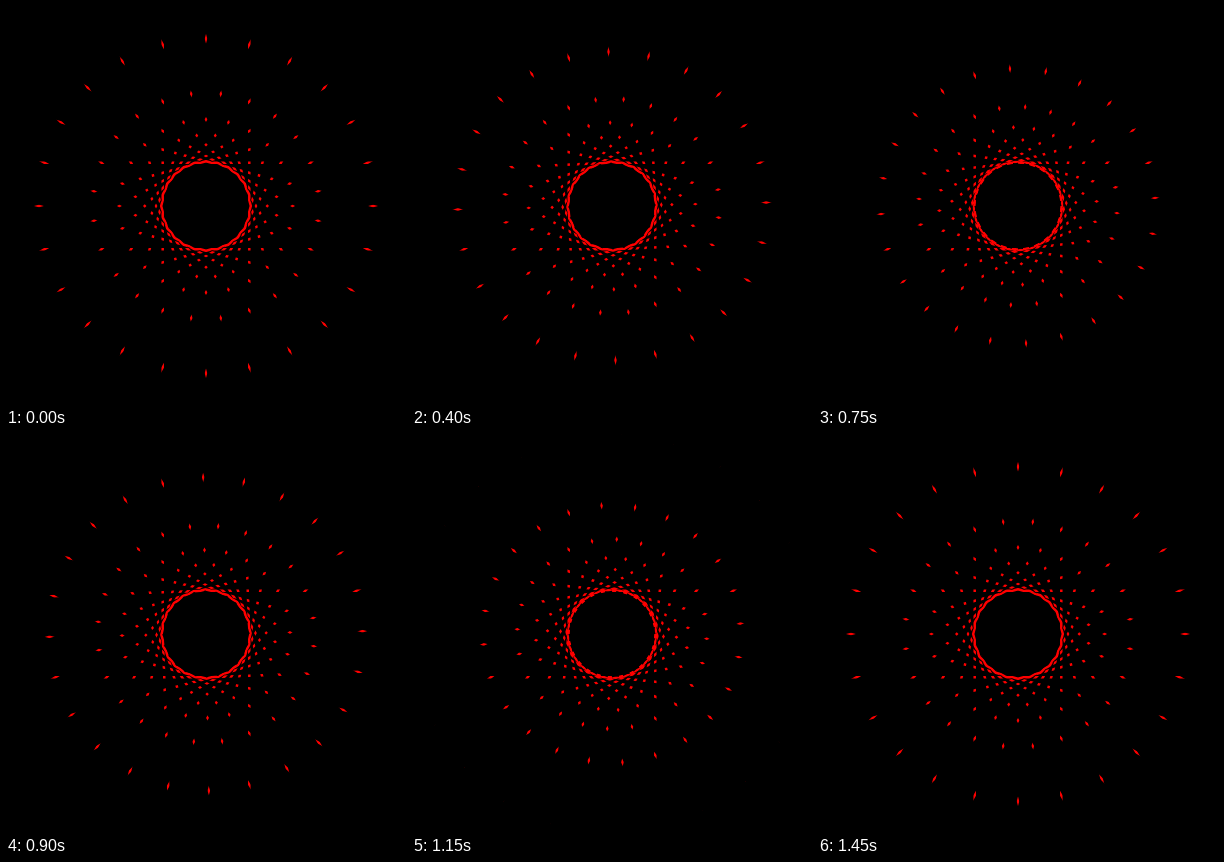
An HTML page with a canvas that plays this animation: 400x400 px, repeating every 1500 ms.

```html
<!DOCTYPE html>
<html lang="en">
<head>
<meta charset="utf-8">
<title>Crossing tangents</title>
<style>
  html, body { margin: 0; width: 100%; height: 100%; overflow: hidden; background: #000; }
  canvas { display: block; }
</style>
</head>
<body>
<canvas id="stage" width="400" height="400"></canvas>
<script>
const ctx = document.getElementById('stage').getContext('2d');

const SIZE = 400;
const RAYS = 24;
const OUTER = 200;
const INNER = OUTER * Math.sin(12.5 * Math.PI / 180);
const RAY_LENGTH = Math.sqrt(OUTER ** 2 - INNER ** 2);
const LINE_WIDTH = 2.5;
const STEP_MS = 50;
const STEPS = 30;
const TOTAL_TURN = Math.PI / 4;

// Strokes rays that leave the inner circle along its tangents;
// side is 1 for clockwise rays and -1 for counterclockwise ones.
function strokeRays(turn, side) {
  ctx.beginPath();
  for (let i = 0; i < RAYS; i++) {
    const angle = turn + i * 2 * Math.PI / RAYS;
    const cos = Math.cos(angle);
    const sin = Math.sin(angle);
    const x = INNER * cos;
    const y = INNER * sin;
    ctx.moveTo(x, y);
    ctx.lineTo(x - side * RAY_LENGTH * sin, y + side * RAY_LENGTH * cos);
  }
  ctx.stroke();
}

function draw(time) {
  const step = Math.floor(time / STEP_MS) % STEPS;
  const turn = TOTAL_TURN * step / (STEPS - 1);

  ctx.setTransform(1, 0, 0, 1, 0, 0);
  ctx.clearRect(0, 0, SIZE, SIZE);
  ctx.translate(SIZE / 2, SIZE / 2);
  ctx.strokeStyle = '#f00';
  ctx.lineWidth = LINE_WIDTH;

  // Only the places where both sets of rays overlap stay visible.
  ctx.globalCompositeOperation = 'source-over';
  strokeRays(0, 1);
  ctx.globalCompositeOperation = 'destination-in';
  strokeRays(turn, -1);
}

function tick() {
  draw(performance.now());
  requestAnimationFrame(tick);
}
tick();
</script>
</body>
</html>
```
